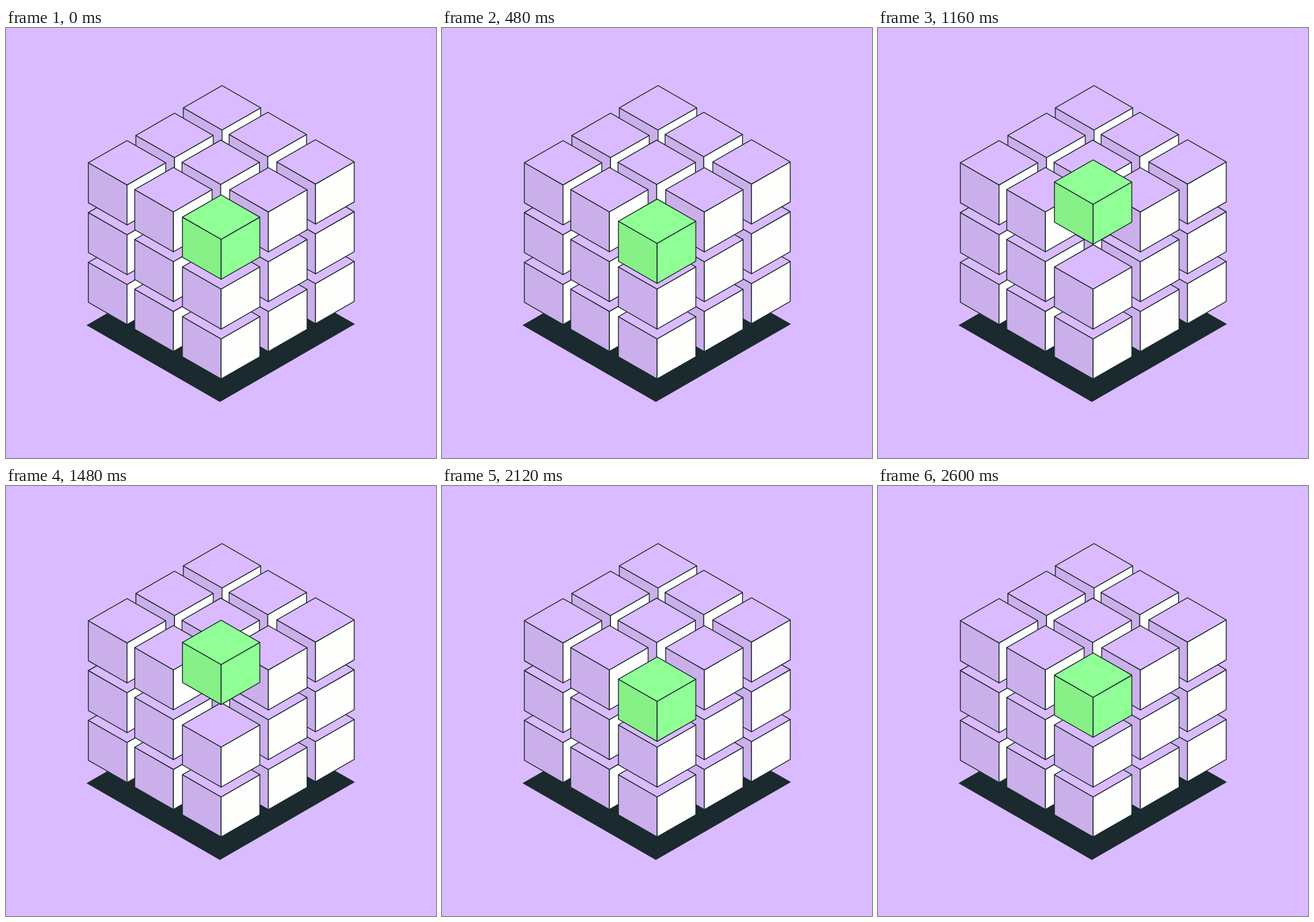
Recreate the animation shown at these times as an HTML page. Size 748x748 px, loop 3000 ms.

```html
<!DOCTYPE html>
<html lang="en">
<head>
<meta charset="utf-8">
<title>Cube stack</title>
<style>
  html, body { margin: 0; width: 100%; height: 100%; overflow: hidden; background: #dabbff; }
  svg { display: block; width: 100%; height: 100%; }
  path { stroke: #1b2a2e; stroke-width: 1.5; stroke-linejoin: round; }
  .floor { fill: #1b2a2e; stroke: none; }
  .top { fill: #dabbff; }
  .left { fill: #cbafeb; }
  .right { fill: #fefffd; }
  .lift .top, .lift .right { fill: #90ff96; }
  .lift .left { fill: #87f087; }
</style>
</head>
<body>
<svg id="stage" viewBox="0 0 748 748">
  <path class="floor" d="M140 517 L374 382 L607 515 L372 650.5 Z"/>
</svg>
<script>
const W = 67.3, H = 38.6, V = 69.6, LAYER = 86.6;
const LOOP = 3000, STEP = 40;

// Top corner of each column, back to front
const columns = [
  [375.8, 100.2], [293.2, 148.2], [455.4, 146.6],
  [210.6, 195.8], [373.5, 195], [538.4, 194.3],
  [291.2, 242.6], [456.4, 242.8], [374.2, 290.4]
];

// Vertical offset: start time, end time, from, to, easing x1, x2
const moves = [
  [0, 440, 0, 7.4, 0.4, 0.6],
  [440, 1280, 7.4, -62, 0.42, 0.25],
  [1280, 2150, -62, 7.3, 0.52, 0.667],
  [2150, 2600, 7.3, 0, 0.4, 0.6]
];

const stage = document.getElementById('stage');

function add(parent, tag, attrs) {
  const el = document.createElementNS('http://www.w3.org/2000/svg', tag);
  for (const key in attrs) el.setAttribute(key, attrs[key]);
  return parent.appendChild(el);
}

function cube(x, y, name) {
  const g = add(stage, 'g', { class: name });
  const face = (cls, d) => add(g, 'path', { class: cls, d });
  face('left', `M${x} ${y + 2 * H} l${-W} ${-H} v${V} l${W} ${H} Z`);
  face('right', `M${x} ${y + 2 * H} l${W} ${-H} v${V} l${-W} ${H} Z`);
  face('top', `M${x} ${y} l${W} ${H} l${-W} ${H} l${-W} ${-H} Z`);
  return g;
}

let lift;
for (let level = 2; level >= 0; level--) {
  columns.forEach(([x, y], i) => {
    const front = level === 0 && i === columns.length - 1;
    const g = cube(x, y + level * LAYER, front ? 'lift' : 'cube');
    if (front) lift = g;
  });
}

// Cubic bezier easing with flat ends
function ease(p, x1, x2) {
  let lo = 0, hi = 1, s = p;
  for (let i = 0; i < 24; i++) {
    s = (lo + hi) / 2;
    const r = 1 - s;
    const x = 3 * s * r * r * x1 + 3 * s * s * r * x2 + s * s * s;
    if (x < p) lo = s; else hi = s;
  }
  return s * s * (3 - 2 * s);
}

function offset(t) {
  const move = moves.find(m => t < m[1]);
  if (!move) return 0;
  const [start, end, from, to, x1, x2] = move;
  return from + (to - from) * ease((t - start) / (end - start), x1, x2);
}

const begin = performance.now();

function draw() {
  const t = Math.max(0, performance.now() - begin) % LOOP;
  const y = offset(Math.floor(t / STEP) * STEP);
  lift.setAttribute('transform', `translate(0 ${y.toFixed(2)})`);
  requestAnimationFrame(draw);
}
draw();
</script>
</body>
</html>
```
